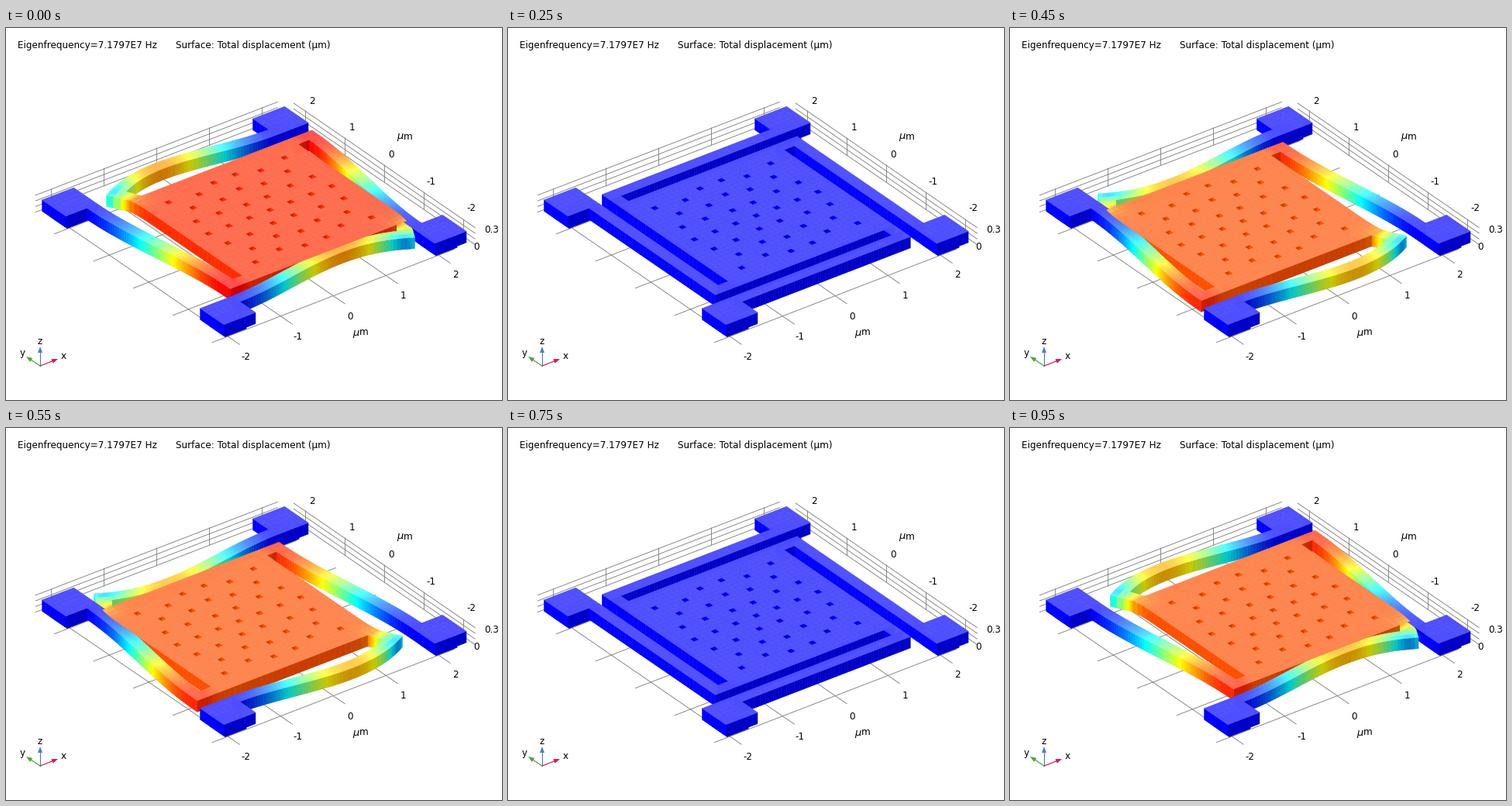
A matplotlib script that plays this animation: 640x480 px, repeating every 1000 ms.

```python
import numpy as np
import matplotlib.pyplot as plt
from matplotlib.animation import FuncAnimation
from matplotlib.collections import LineCollection, PolyCollection

W, H, DPI = 640, 480, 80
FRAMES, INTERVAL = 20, 50
PX = 72 / DPI                                   # one pixel in points

# Orthographic view: screen vectors of one micrometre along x, y, z
CENTER = np.array([320.3, 263.9])
BASIS = np.array([[68, -26.2], [-51, -35], [0, -72.9]])

# Mode shape
PLATE_U, PLATE_V = 0.295, -0.01
END_U, MAX_U = 0.313, 0.313
TIP_U, TIP_V, TURN, SPAN = 0.12, -0.02, 0.55, 3.1

TOP, SIDE, FRONT = range(3)
SHADE = np.array([[0.31, 0.69], [0, 1], [0, 0.78]])   # offset, gain


def project(points):
    return CENTER + np.asarray(points, float) @ BASIS


def fixed(x, y):
    return 0 * x, 0 * y


def plate(x, y):
    near = np.minimum(np.hypot(x - 1.45, y + 1.5), np.hypot(x + 1.45, y - 1.5))
    return PLATE_U - 0.06 * np.exp(-near / 0.12), PLATE_V + 0 * x


def front_beam(x, y):
    q = np.clip((x + 1.7) / SPAN, 0, 1)
    v = TURN * SPAN * q**2 * (1 - q) + TIP_V * (3 * q**2 - 2 * q**3)
    slope = TURN * q * (2 - 3 * q) + TIP_V * 6 * q * (1 - q) / SPAN
    return TIP_U * q - slope * (y + 1.8), v - TURN * np.maximum(x - 1.4, 0)


def left_beam(x, y):
    q = np.clip((1.7 - y) / SPAN, 0, 1)
    slope = END_U * 6 * q * (1 - q) / SPAN
    return END_U * (3 * q**2 - 2 * q**3), (x + 1.8) * slope + PLATE_V * q


def blend(a, b, t):
    return tuple(p + (q - p) * t for p, q in zip(a, b))


def front_link(x, y):
    return blend(front_beam(x, -1.7 + 0 * y), plate(x, -1.5 + 0 * y), (y + 1.7) / 0.2)


def left_link(x, y):
    return blend(left_beam(-1.7 + 0 * x, y), plate(-1.5 + 0 * x, y), (x + 1.7) / 0.2)


class Group:
    """Quads with their displacement and shade."""

    def __init__(self):
        self.pos, self.disp, self.shade = [], [], []

    def add(self, quads, field, shade):
        quads = np.asarray(quads, float)
        u, v = field(quads[..., 0], quads[..., 1])
        self.pos.append(quads)
        self.disp.append(np.stack([u, v, 0 * u], axis=-1))
        self.shade.append(np.full(len(quads), shade))

    def pack(self):
        self.pos, self.disp, self.shade = map(
            np.concatenate, (self.pos, self.disp, self.shade))

    def draw(self, amp, by_depth=False):
        pos = self.pos + amp * self.disp
        level = abs(amp) * np.linalg.norm(self.disp, axis=-1).mean(axis=1) / MAX_U
        offset, gain = SHADE[self.shade].T
        colors = offset[:, None] + gain[:, None] * rainbow(level)
        verts = project(pos)
        if by_depth:
            order = np.argsort(-(pos @ [0.6, 0.8, 0]).mean(axis=1))
            verts, colors = verts[order], colors[order]
        return verts, colors


def rainbow(t):
    t = 3 * np.clip(t, 0, 1)
    return np.stack([np.clip(t - 1, 0, 1), np.clip(np.minimum(t, 3 - t), 0, 1),
                     np.clip(2 - t, 0, 1)], axis=-1)


def patch(origin, edge1, edge2, n1, n2):
    i, j = [g.ravel()[:, None] for g in np.meshgrid(np.arange(n1), np.arange(n2))]
    e1, e2 = np.array(edge1) / n1, np.array(edge2) / n2
    return np.stack([np.array(origin) + (i + a) * e1 + (j + b) * e2
                     for a, b in ((0, 0), (1, 0), (1, 1), (0, 1))], axis=1)


def slab(x0, x1, y0, y1, field, nx, ny, tops, walls, z0=0.1, z1=0.3):
    dx, dy, dz = (x1 - x0, 0, 0), (0, y1 - y0, 0), (0, 0, z1 - z0)
    tops.add(patch((x0, y0, z1), dx, dy, nx, ny), field, TOP)
    walls.add(patch((x0, y0, z0), dy, dz, ny, 1), field, SIDE)
    walls.add(patch((x0, y0, z0), dx, dz, nx, 1), field, FRONT)


def slab_pair(x0, x1, y0, y1, field, nx, ny):
    """A slab and its half-turn twin; the mode is even under a half turn."""
    slab(x0, x1, y0, y1, field, nx, ny, beams, walls)
    slab(-x1, -x0, -y1, -y0, lambda x, y: field(-x, -y), nx, ny, beams, walls)


posts, walls, beams, deck, holes = groups = [Group() for _ in range(5)]

for cx in (-2, 2):
    for cy in (-2, 2):
        slab(cx - 0.2, cx + 0.2, cy - 0.2, cy + 0.2, fixed, 1, 1, posts, posts, 0, 0.1)
        slab(cx - 0.3, cx + 0.3, cy - 0.3, cy + 0.3, fixed, 6, 6, beams, walls)
slab_pair(-1.7, 1.5, -1.9, -1.7, front_beam, 64, 2)
slab_pair(1.3, 1.5, -1.7, -1.5, front_link, 4, 8)
slab_pair(-1.9, -1.7, -1.5, 1.7, left_beam, 2, 64)
slab_pair(-1.7, -1.5, -1.5, -1.3, left_link, 4, 4)
slab(-1.5, 1.5, -1.5, 1.5, plate, 30, 30, deck, walls)

hole_spots = [(0, 0)] + [(x, y) for x in (-1.1, 1.1) for y in (-1.1, 1.1)]
for ring in (1, 2, 3):
    for k in range(6 * ring):
        angle = 2 * np.pi * k / (6 * ring)
        hole_spots.append((0.39 * ring * np.cos(angle), 0.39 * ring * np.sin(angle)))
for x, y in hole_spots:
    r = 0.04
    left, top, right, bottom = [(x + a * r, y + b * r, 0.3)
                                for a, b in ((-1, 1), (1, 1), (1, -1), (-1, -1))]
    holes.add([(left, top, bottom, bottom)], plate, FRONT)
    holes.add([(top, right, bottom, bottom)], plate, SIDE)

for group in groups:
    group.pack()

fig = plt.figure(figsize=(W / DPI, H / DPI), dpi=DPI, facecolor="white")
ax = fig.add_axes([0, 0, 1, 1])
ax.set(xlim=(0, W), ylim=(H, 0))
ax.axis("off")


def label(x, y, text, ha="center", size=12, **kw):
    ax.text(x, y + 4.5, text, fontsize=size * PX, family="DejaVu Sans", ha=ha,
            va="baseline", color="black", **kw)


# Grid on the floor and the two back walls
EDGE, WALL, FLOOR = 2.3, 2.47, -0.16
lines = []
for k in range(-2, 3):
    lines += [[(k, -EDGE, FLOOR), (k, EDGE, FLOOR)],
              [(-EDGE, k, FLOOR), (EDGE, k, FLOOR)],
              [(k, WALL, 0), (k, WALL, 0.32)],
              [(WALL, k, 0), (WALL, k, 0.32)]]
for z in (0, 0.1, 0.2, 0.3):
    lines += [[(-EDGE, WALL, z), (EDGE, WALL, z)],
              [(WALL, -EDGE, z), (WALL, EDGE, z)]]
ax.add_collection(LineCollection([project(l) for l in lines], colors="#808080",
                                 linewidths=0.9 * PX, zorder=1))

label(15, 21.5, "Eigenfrequency=7.1797E7 Hz", "left")
label(219, 21.5, "Surface: Total displacement (µm)", "left")
for k in range(-2, 3):
    label(444.3 + 67.7 * k, 371 - 26.5 * k, str(k))
    label(497.3 - 51.3 * k, 162.6 - 34.7 * k, str(k))
label(626.5, 260, "0.3")
label(607, 281.5, "0")
for x, y in ((504, 139), (447, 392)):
    label(x, y, "μ", "left", 13, style="italic")
    label(x + 9, y, "m", "left")

# Axis triad
origin = np.array([44, 436])
for name, tip, spot, color in (("z", (44, 411), (44, 403), "#4a80bd"),
                               ("x", (67, 427), (74.5, 422.5), "#cc1f5a"),
                               ("y", (26, 424), (21.5, 418), "#4ca43c")):
    tip = np.array(tip, float)
    along = (tip - origin) / np.linalg.norm(tip - origin)
    across = np.array([-along[1], along[0]])
    base = tip - 8 * along
    ax.plot(*np.stack([origin, base]).T, color=color, lw=1.2 * PX)
    ax.fill(*np.stack([tip, base + 3 * across, base - 3 * across]).T, color=color, lw=0)
    label(*spot, name)

body = PolyCollection([], linewidths=0.5 * PX, zorder=3)
ax.add_collection(body, autolim=False)


def update(frame):
    amp = np.cos(2 * np.pi * frame / FRAMES)
    parts = [g.draw(amp, g is walls) for g in groups]
    colors = np.concatenate([c for _, c in parts])
    body.set_verts(np.concatenate([v for v, _ in parts]))
    body.set_facecolor(colors)
    body.set_edgecolor(colors)
    return [body]


anim = FuncAnimation(fig, update, frames=FRAMES, interval=INTERVAL, repeat=True,
                     repeat_delay=0, blit=False)
plt.show()
```
